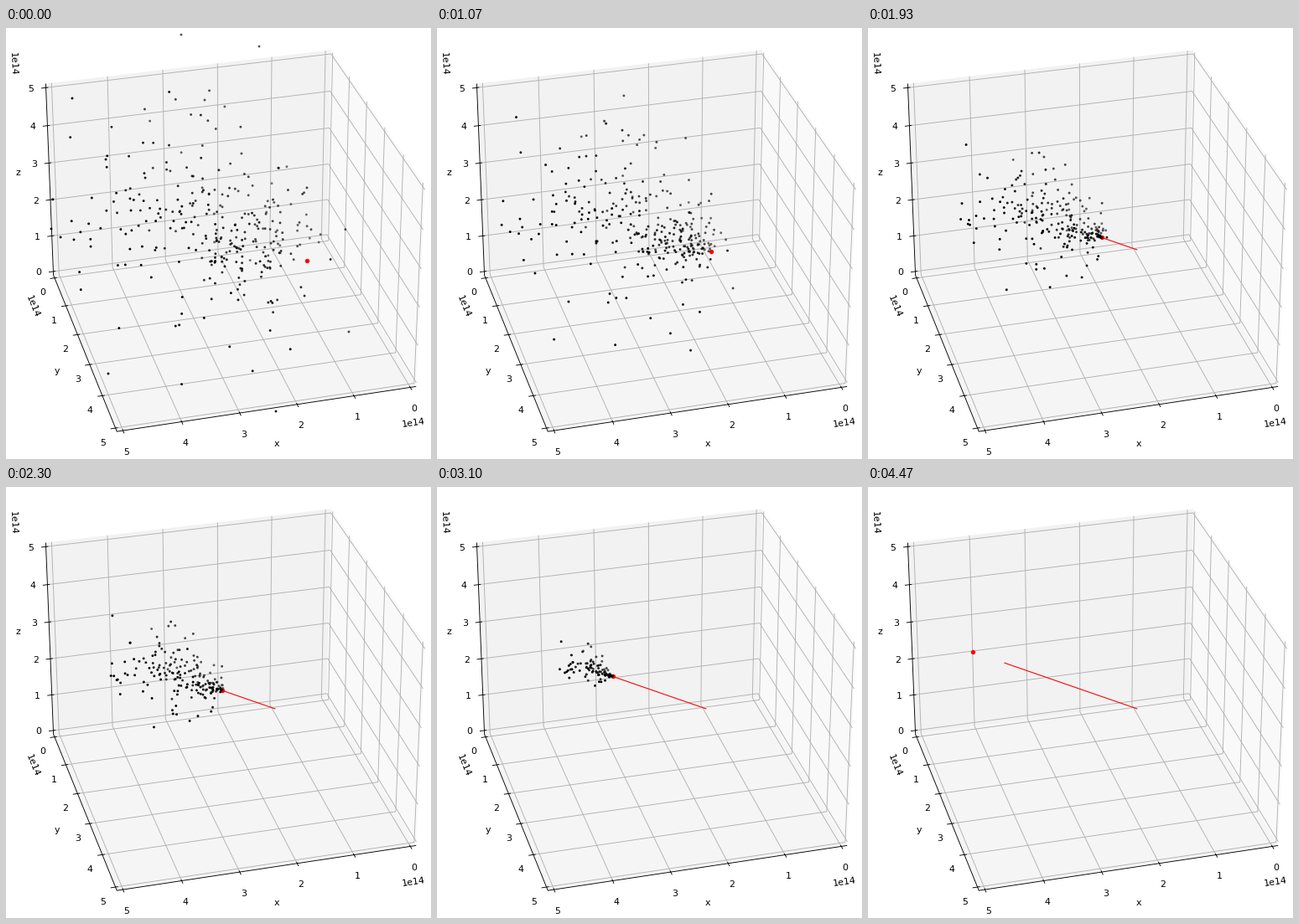
Animation, 507 px wide and 515 px high, one loop 5.01 s. Source, as a matplotlib script:

```python
import numpy as np
import matplotlib.pyplot as plt
from matplotlib.animation import FuncAnimation

W, H, DPI = 507, 515, 64
PX = 72 / DPI                      # points per pixel
FRAMES, LOOP_MS = 150, 5010
HOLD, STEPS = 15, 119              # still frames at the start, moving steps
FIRST_HIT, LAST_HIT = 20.2, 99.7   # steps between which stones are hit
STONES = 300

plt.rcParams["font.family"] = "DejaVu Sans"
fig = plt.figure(figsize=(W / DPI, H / DPI), dpi=DPI, facecolor="white")
ax = fig.add_axes([0, 0, 1, 1])
ax.set_xlim(0, W)
ax.set_ylim(H, 0)
ax.axis("off")

# ---- camera looking at the centre of the box ----
ELEV, AZIM = np.radians((30, 75))
DIST, SCALE = 10, 303
CENTER = np.array([265.2, 244.9])
BOX = 0.2976 * np.array([4, 4, 3])
SE, CE, SA, CA = np.sin(ELEV), np.cos(ELEV), np.sin(AZIM), np.cos(AZIM)
TOWARD = np.array([CE * CA, CE * SA, SE])
RIGHT = np.array([-SA, CA, 0])
UP = np.array([-SE * CA, -SE * SA, CE])


def project(a, b, c):
    """Screen position of a point given in box fractions along x, y, z."""
    p = (np.array([a, b, c]) - 0.5) * BOX
    zoom = SCALE * DIST / (DIST - p @ TOWARD)
    return CENTER + zoom * np.array([p @ RIGHT, -(p @ UP)])


def frac(value):
    """Box fraction of an axis value from 0 to 5, with the margin."""
    return (value + 5 / 48) / (5 + 5 / 24)


def stroke(points, color="black", z=2):
    xs, ys = np.transpose([project(*p) for p in points])
    ax.plot(xs, ys, color=color, lw=0.9 * PX, zorder=z,
            solid_capstyle="butt", solid_joinstyle="round")


def write(x, y, text, angle=0):
    ax.text(x, y, text, fontsize=11 * PX, rotation=angle,
            ha="center", va="center", zorder=3)


def pane(corners, color):
    ax.fill(*np.transpose([project(*p) for p in corners]), color=color,
            lw=0, zorder=0)


def draw_box():
    pane([(0, 0, 0), (0, 1, 0), (0, 1, 1), (0, 0, 1)], "#f9f9f9")
    pane([(0, 0, 0), (1, 0, 0), (1, 0, 1), (0, 0, 1)], "#f2f2f2")
    pane([(0, 0, 0), (1, 0, 0), (1, 1, 0), (0, 1, 0)], "#f5f5f5")

    out, inn = 1.016, 0.992
    for k in range(6):
        f = frac(k)
        for path in ([(f, 0, 1), (f, 0, 0), (f, 1, 0)],
                     [(0, f, 1), (0, f, 0), (1, f, 0)],
                     [(1, 0, f), (0, 0, f), (0, 1, f)]):
            stroke(path, "#b0b0b0", z=1)
        stroke([(f, inn, 0), (f, out, 0)])
        stroke([(inn, f, 0), (out, f, 0)])
        stroke([(inn, 0, f), (out, 0, f)])
        for base, offset in (((f, 1, 0), (4.4, 25.5)),
                             ((1, f, 0), (-14.5, 17.7)),
                             ((1, 0, f), (-17.5, 1.3))):
            write(*project(*base) + offset, str(k))

    stroke([(0, 1, 0), (1, 1, 0), (1, 0, 0), (1, 0, 1)])
    write(323, 497, "x")
    write(60.5, 410, "y")
    write(14, 173, "z")
    write(486, 471.5, "1e14", 8.5)
    write(32, 333, "1e14", -68)
    write(8, 43, "1e14", -87.6)


# ---- motion: straight paths with a slight perspective speed-up ----
def travel(start, end, u):
    u = np.reshape(u, (-1, 1))
    d = end - start
    return start + d * u * (1 + 0.0003 * d[:, :1] * (1 - u))


ROCK = np.array([[358.5, 278.0]]), np.array([[122.5, 196.2]])


def rock_at(step):
    return travel(*ROCK, np.asarray(step) / STEPS)


def scatter_stones(count, rng):
    """Start points and hit steps: the later the hit, the wider the spread."""
    hits = np.linspace(FIRST_HIT, LAST_HIT, count)
    starts = []
    for hit, spot in zip(hits, rock_at(hits)):
        while True:
            drift = hit * np.array([0.12, -0.05])
            p = spot + drift + (10 + 0.55 * hit) * rng.standard_t(4, 2)
            if np.hypot(*((p - (232, 233)) / (178, 225))) < 1:
                break
        starts.append(p)
    return np.array(starts), hits


rng = np.random.default_rng(24)
starts, hits = scatter_stones(STONES, rng)

# a few far stones set the outer reach: start x, start y, hit step
FAR = np.array([(209, 8, 55), (302, 22, 36), (79, 84, 98), (54, 240, 93),
                (122, 413, 80), (322, 458, 49), (409, 363, 34.5)])
starts = np.vstack([starts, FAR[:, :2]])
hits = np.append(hits, FAR[:, 2])
spots = rock_at(hits)

# stones further back, to the upper right, look paler
depth = 0.0012 * (starts[:, 1] - 240) - 0.0016 * (starts[:, 0] - 250)
shades = np.zeros((len(hits), 4))
shades[:, 3] = np.clip(0.82 + depth + rng.normal(0, 0.08, len(hits)), 0.45, 1)

draw_box()
trail, = ax.plot([], [], color="red", lw=1.1 * PX, zorder=4)
rock = ax.scatter([], [], s=(5.4 * PX) ** 2, c="red", lw=0, zorder=5)
dots = ax.scatter([], [], s=(2.9 * PX) ** 2, c="black", lw=0, zorder=6)


def update(frame):
    step = min(max(frame - HOLD, 0), STEPS)
    alive = hits > step
    dots.set_offsets(travel(starts[alive], spots[alive], step / hits[alive]))
    dots.set_facecolors(shades[alive])
    rock.set_offsets(rock_at(step))
    if step > FIRST_HIT:
        ends = rock_at([FIRST_HIT, min(step, LAST_HIT)])
        trail.set_data(ends[:, 0], ends[:, 1])
    else:
        trail.set_data([], [])
    return trail, rock, dots


anim = FuncAnimation(fig, update, frames=FRAMES, interval=LOOP_MS / FRAMES,
                     init_func=lambda: update(0), repeat=True, repeat_delay=0)
plt.show()
```
